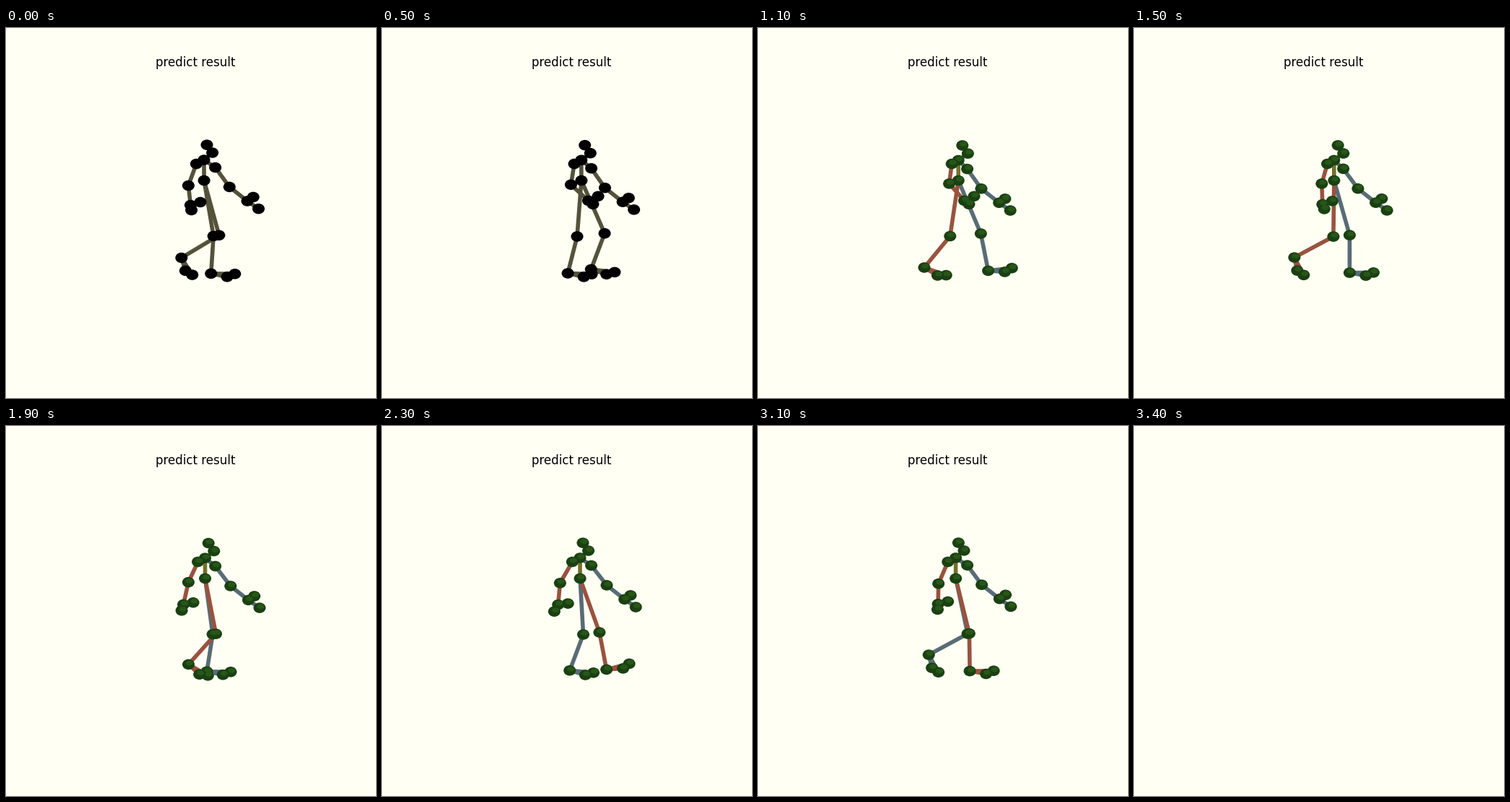
These frames come from a looping animation (512x512 px, 3500 ms). A matplotlib script:

```python
import numpy as np
import matplotlib.pyplot as plt
from matplotlib.animation import FuncAnimation
from matplotlib.collections import EllipseCollection, LineCollection

SIZE, DPI = 512, 100
STEP, FRAMES = 100, 35
OBSERVED = 10           # leading frames drawn in black
STRIDE = 3250           # ms per full walking cycle
TILT = .8               # vertical foreshortening of the view
PAPER = "#fffff4"
RIGHT, LEFT, SPINE = "#99533f", "#586c76", "#74702c"

# Lower leg and foot angles in degrees over one stride
KEYS = np.array([0, .16, .35, .47, .65, .71, .85])
SHANK = np.array([-3, -12, -35, -56, -18, 9, 8.5])
FOOT = np.array([1, 3, 26, 67, 10, -18, -7])

# Trunk: x, y, sway in x, sway in y
TRUNK = {
    "head": (279.8, 162, 3, .5),
    "face": (287.4, 173, 3, .7),
    "neck": (275.2, 182.7, 2, .3),
    "hips": (275.3, 211, 2, 0),
    "r_shoulder": (265.2, 188, 3, 0),
    "l_shoulder": (289.6, 193.8, 0, 1.3),
}


def wave(t, peak):
    return np.cos(2 * np.pi * (t - peak) / STRIDE)


def cyclic(values, p):
    """Smooth closed curve through the stride keys."""
    n = len(KEYS)
    i = np.searchsorted(KEYS, p % 1, side="right") - 1
    k = i + np.arange(-1, 3)
    x, y = KEYS[k % n] + k // n, values[k % n]
    h = x[2] - x[1]
    u = (p % 1 - x[1]) / h
    m0, m1 = h * (y[2] - y[0]) / (x[2] - x[0]), h * (y[3] - y[1]) / (x[3] - x[1])
    return ((2*u**3 - 3*u**2 + 1) * y[1] + (u**3 - 2*u**2 + u) * m0
            + (3*u**2 - 2*u**3) * y[2] + (u**3 - u**2) * m1)


def reach(start, length, angle):
    """End of a segment; 0 degrees points down, positive swings forward."""
    a = np.radians(angle)
    return start + length * np.array([np.sin(a), TILT * np.cos(a)])


def leg(side, hips, thigh, p):
    knee = reach(hips, 97, thigh)
    ankle = reach(knee, 65, cyclic(SHANK, p))
    pitch = 90 - cyclic(FOOT, p)
    return {side + "knee": knee, side + "ankle": ankle,
            side + "ball": reach(ankle, 23, pitch - 13),
            side + "toe": reach(ankle, 33, pitch)}


def right_arm(t):
    c, c2 = wave(t, 800), wave(2 * t, 1600)
    wrist = np.array([261.8 + 25 * c + 7 * c2, 243.7 - 5 * c - 1.5 * c2])
    return {"r_elbow": np.array([255 + 10 * wave(t, 950), 216.8 - 1.5 * wave(t, 1300)]),
            "r_wrist": wrist,
            "r_thumb": wrist + (13.5, -4 - 2.5 * c),
            "r_finger": wrist + (1 + 6.5 * c, 7 - 2.5 * c)}


def left_arm(t):
    drift = np.array([1.3 * wave(t, 2250), 1.4 * wave(t, 1250)])
    spots = {"elbow": (309.7, 221), "wrist": (334.4, 240.5),
             "thumb": (342.6, 235), "finger": (349.9, 251.2)}
    return {"l_" + n: xy + drift for n, xy in spots.items()}


def pose(t):
    sway = wave(t, 1150)
    joints = {n: np.array([x + ax * sway, y + ay * sway])
              for n, (x, y, ax, ay) in TRUNK.items()}
    p = t / STRIDE
    hips = joints["hips"]
    return (joints | left_arm(t) | right_arm(t)
            | leg("l_", hips, 11.5 + 9 * wave(t, .235 * STRIDE), p + .5)
            | leg("r_", hips, 5 + 12.5 * wave(t, .785 * STRIDE), p))


def chain(color, *names):
    return [(a, b, color) for a, b in zip(names, names[1:])]


def limbs(side, color):
    shoulder, elbow, wrist, thumb, finger, knee, ankle, ball, toe = (
        side + n for n in ("shoulder", "elbow", "wrist", "thumb", "finger",
                           "knee", "ankle", "ball", "toe"))
    return (chain(color, "neck", shoulder, elbow, wrist, thumb)
            + chain(color, wrist, finger)
            + chain(color, "hips", knee, ankle, ball) + chain(color, ankle, toe))


BONES = (limbs("l_", LEFT) + chain(SPINE, "head", "face", "neck", "hips")
         + limbs("r_", RIGHT))
COLORS = [c for _, _, c in BONES]

fig = plt.figure(figsize=(SIZE / DPI, SIZE / DPI), dpi=DPI, facecolor=PAPER)
ax = fig.add_axes([0, 0, 1, 1])
ax.set(xlim=(0, SIZE), ylim=(SIZE, 0))
ax.axis("off")

title = ax.text(262.4, 53, "predict result", fontsize=12, ha="center",
                va="baseline", family="DejaVu Sans", color="black")
bones = LineCollection([], linewidths=5.6 * 72 / DPI, capstyle="round", zorder=2)
ax.add_collection(bones)


def dots(w, h, z):
    c = EllipseCollection([w], [h], [0], units="xy", offsets=[(0, 0)],
                          offset_transform=ax.transData, linewidths=0, zorder=z)
    ax.add_collection(c)
    return c


joint_dots = dots(17, 14.5, 3)
shine = dots(10, 7, 4)
parts = (title, bones, joint_dots, shine)


def draw(i):
    for part in parts:
        part.set_visible(i < FRAMES - 1)
    joints = pose(i * STEP)
    spots = np.array(list(joints.values()))
    observed = i < OBSERVED
    bones.set_segments([(joints[a], joints[b]) for a, b, _ in BONES])
    bones.set_color("#54523a" if observed else COLORS)
    joint_dots.set_offsets(spots)
    joint_dots.set_facecolor("black" if observed else "#1a4012")
    shine.set_offsets(spots + (1.5, -2))
    shine.set_facecolor("black" if observed else "#275618")
    return parts


anim = FuncAnimation(fig, draw, frames=FRAMES, interval=STEP, repeat=True,
                     repeat_delay=0, init_func=lambda: draw(0))
plt.show()
```
